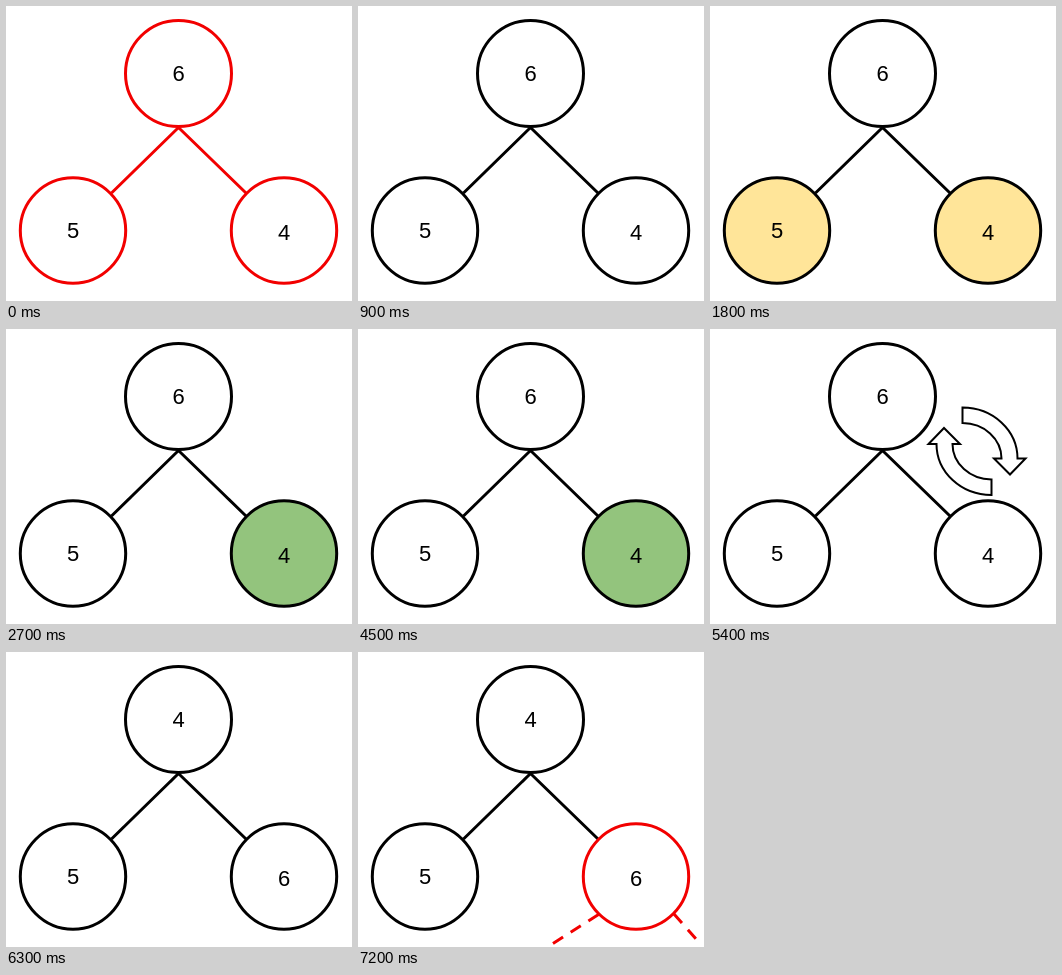
An HTML page that plays this animation: 346x295 px, repeating every 8.1 s.

```html
<!DOCTYPE html>
<html lang="en">
<head>
<meta charset="utf-8">
<title>Heap swap</title>
<style>
  html, body { margin: 0; width: 100%; height: 100%; overflow: hidden; background: #fff; }
  svg { display: block; width: 100%; height: 100%; }
  text { font: 22px "Liberation Sans", Arial, sans-serif; text-anchor: middle; fill: #000; stroke: none; }
</style>
</head>
<body>
<svg viewBox="0 0 346 295" fill="none" stroke-width="3">
  <path id="edges" d="M105.5 187 172.5 121.5 240 187"/>
  <g id="top"><circle cx="172.5" cy="67.5" r="53"/><text x="172.5" y="75"></text></g>
  <g id="left"><circle cx="67" cy="224.5" r="52.7"/><text x="67" y="232"></text></g>
  <g id="right"><circle cx="278" cy="224.5" r="52.7"/><text x="278" y="234"></text></g>
  <g id="arrows" stroke="#000" stroke-width="2" fill="#fff">
    <path id="arrow" d="M252.5 78.5A55 51 0 0 1 307.5 129.5H315.5L300 145.5 284 129.5H291.5A39 35.5 0 0 0 252.5 94Z"/>
    <use href="#arrow" transform="rotate(180 267 122.25)"/>
  </g>
  <path id="branches" stroke-dasharray="12 9" d="M240.5 262.5 195 291.5M316 262 338.5 287.5"/>
</svg>
<script>
const STEP = 900;
const BLACK = "#000", RED = "#f20000", WHITE = "#fff", YELLOW = "#ffe599", GREEN = "#93c47d";
const byId = id => document.getElementById(id);

// Each step lists only what differs from the plain black tree.
const steps = [
  { stroke: RED },
  {},
  { left: YELLOW, right: YELLOW },
  { right: GREEN },
  { top: YELLOW, right: YELLOW },
  { right: GREEN },
  { arrows: true },
  { swapped: true },
  { swapped: true, rightStroke: RED, branches: true }
];

function drawNode(id, label, fill = WHITE, stroke = BLACK) {
  const [circle, text] = byId(id).children;
  circle.setAttribute("fill", fill);
  circle.setAttribute("stroke", stroke);
  text.textContent = label;
}

function show(id, visible) {
  byId(id).setAttribute("visibility", visible ? "visible" : "hidden");
}

function draw(step) {
  const stroke = step.stroke || BLACK;
  const [parent, child] = step.swapped ? [4, 6] : [6, 4];
  byId("edges").setAttribute("stroke", stroke);
  byId("branches").setAttribute("stroke", RED);
  drawNode("top", parent, step.top, stroke);
  drawNode("left", 5, step.left, stroke);
  drawNode("right", child, step.right, step.rightStroke || stroke);
  show("arrows", step.arrows);
  show("branches", step.branches);
}

const start = performance.now();
function tick() {
  const elapsed = performance.now() - start;
  draw(steps[Math.floor(elapsed / STEP) % steps.length]);
  requestAnimationFrame(tick);
}
tick();
</script>
</body>
</html>
```
